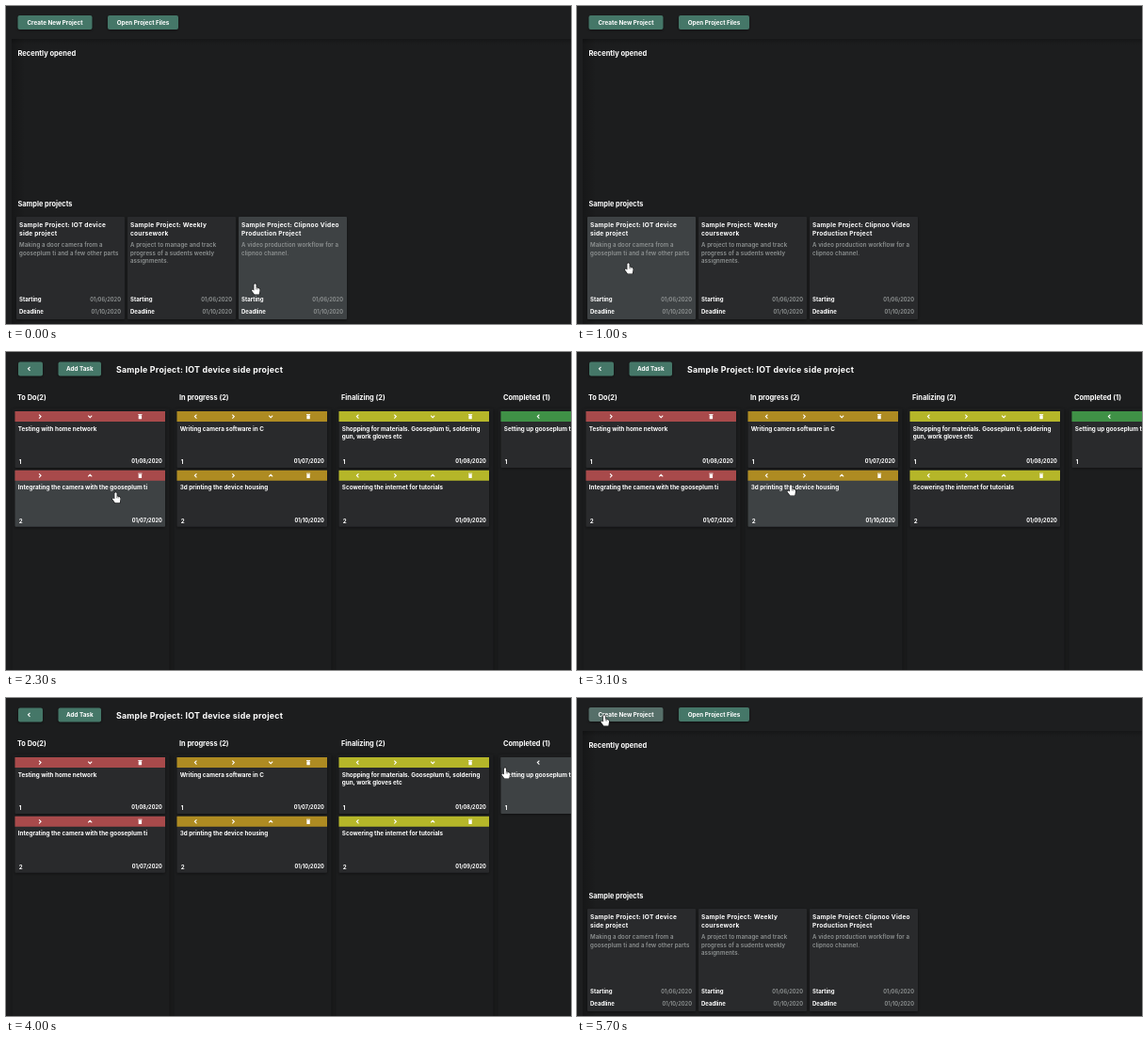
Write an HTML page with a canvas that moves like this. It is 600 px wide and 338 px high and loops after 5.8 s.

```html
<!DOCTYPE html>
<html lang="en">
<head>
<meta charset="utf-8">
<title>Project board</title>
<style>
html, body { margin: 0; height: 100%; overflow: hidden; background: #1c1d1e; }
canvas { display: block; width: 100vw; height: 100vh; }
</style>
</head>
<body>
<canvas id="stage"></canvas>
<script>
const W = 600, H = 338, LOOP = 5800, STEP = 100;
const BOARD_OPENS = 1600, BOARD_CLOSES = 5400;
const canvas = document.getElementById('stage');
const ctx = canvas.getContext('2d');
const scale = window.devicePixelRatio || 1;
canvas.width = W * scale;
canvas.height = H * scale;

const CARD = '#292a2c', CARD_HOVER = '#3e4244';
const BUTTON = '#457768', BUTTON_HOVER = '#566f69';
const MUTED = '#8f9393', WHITE = '#fff';

const samples = [
  { title: ['Sample Project: IOT device', 'side project'],
    about: ['Making a door camera from a', 'gooseplum ti and a few other parts'] },
  { title: ['Sample Project: Weekly', 'coursework'],
    about: ['A project to manage and track', 'progress of a sudents weekly', 'assignments.'] },
  { title: ['Sample Project: Clipnoo Video', 'Production Project'],
    about: ['A video production workflow for a', 'clipnoo channel.'] }
];

const columns = [
  { name: 'To Do(2)', color: '#a84a4b', icons: ['right', 'move', 'trash'], tasks: [
    { text: ['Testing with home network'], date: '01/08/2020' },
    { text: ['Integrating the camera with the gooseplum ti'], date: '01/07/2020' }] },
  { name: 'In progress (2)', color: '#ae8b22', icons: ['left', 'right', 'move', 'trash'], tasks: [
    { text: ['Writing camera software in C'], date: '01/07/2020' },
    { text: ['3d printing the device housing'], date: '01/10/2020' }] },
  { name: 'Finalizing (2)', color: '#b5b629', icons: ['left', 'right', 'move', 'trash'], tasks: [
    { text: ['Shopping for materials. Gooseplum ti, soldering', 'gun, work gloves etc'], date: '01/08/2020' },
    { text: ['Scowering the internet for tutorials'], date: '01/09/2020' }] },
  { name: 'Completed (1)', color: '#3f9146', icons: ['left', 'trash'], hoverColor: CARD_HOVER, tasks: [
    { text: ['Setting up gooseplum ti'], date: '01/06/2020' }] }
];

// Pointer tip: time, x, y
const path = [
  [100, 264.5, 295], [700, 54.5, 273], [1700, 54.5, 273], [2100, 82, 150],
  [2700, 215, 146], [3100, 227, 141], [3300, 233, 128], [3900, 522, 70],
  [4000, 530, 74], [4200, 530, 74], [4800, 48, 5], [5000, 46, 7],
  [5100, 46, 7], [5300, 27, 17], [5700, 29, 18]
];

const handShape = new Path2D('M-1.1 1Q0-.6 1.1 1V4.2L4.2 5.2Q5.2 5.8 5 7.6L4.3 11.4H-.6L-3.6 7.4Q-3.1 5.7-1.1 7.4Z');
const knuckles = new Path2D('M1.2 4.4V6.4M2.7 4.9V6.6');
const arrowShape = new Path2D('M0 0V8.4L2 6.7 3.3 9.7 4.6 9.1 3.3 6.2H5.8Z');

let pointer = { x: 0, y: 0, active: false };

function pointerAt(t) {
  const next = path.findIndex(p => p[0] >= t);
  if (next === 0) return { x: path[0][1], y: path[0][2] };
  const [t0, x0, y0] = path[next - 1], [t1, x1, y1] = path[next];
  const u = (t - t0) / (t1 - t0), k = u * u * (3 - 2 * u);
  return { x: x0 + (x1 - x0) * k, y: y0 + (y1 - y0) * k };
}

function hovered(x, y, w, h) {
  const inside = pointer.x >= x && pointer.x <= x + w && pointer.y >= y && pointer.y <= y + h;
  if (inside) pointer.active = true;
  return inside;
}

function rect(x, y, w, h, color, radius = 0) {
  ctx.fillStyle = color;
  ctx.beginPath();
  ctx.roundRect(x, y, w, h, radius);
  ctx.fill();
}

function shadowed(draw, blur = 3) {
  ctx.save();
  ctx.shadowColor = 'rgba(0,0,0,.45)';
  ctx.shadowBlur = blur * scale;
  ctx.shadowOffsetY = scale;
  draw();
  ctx.restore();
}

// Soft dark edge that fades towards (x + dx, y + dy)
function innerShade(x, y, w, h, dx, dy) {
  const fade = ctx.createLinearGradient(x, y, x + dx, y + dy);
  fade.addColorStop(0, 'rgba(0,0,0,.22)');
  fade.addColorStop(1, 'rgba(0,0,0,0)');
  rect(x, y, w, h, fade);
}

function text(str, x, y, size, { color = WHITE, weight = 700, align = 'left', spacing = 0 } = {}) {
  ctx.font = `${weight} ${size}px Inter, sans-serif`;
  ctx.letterSpacing = spacing + 'px';
  ctx.textAlign = align;
  ctx.fillStyle = color;
  ctx.fillText(str, x, y);
}

function lines(list, x, y, leading, size, style) {
  list.forEach((line, i) => text(line, x, y + i * leading, size, style));
}

function button(x, y, w, label) {
  const color = hovered(x, y, w, 15) ? BUTTON_HOVER : BUTTON;
  shadowed(() => rect(x, y, w, 15, color, 2));
  if (label) text(label, x + w / 2, y + 9.6, 6.3, { align: 'center' });
}

function chevron(x, y, direction) {
  const turn = { right: 0, down: 1, left: 2, up: 3 }[direction];
  ctx.save();
  ctx.translate(x, y);
  ctx.rotate(turn * Math.PI / 2);
  ctx.strokeStyle = WHITE;
  ctx.lineWidth = 1.1;
  ctx.beginPath();
  ctx.moveTo(-1, -2);
  ctx.lineTo(1, 0);
  ctx.lineTo(-1, 2);
  ctx.stroke();
  ctx.restore();
}

function trash(x, y) {
  rect(x - 2.1, y - 2.6, 4.2, 0.9, WHITE);
  rect(x - 1.7, y - 1.3, 3.4, 4, WHITE, 0.5);
}

function drawHome() {
  rect(0, 0, W, H, '#1d1e1f');
  rect(6, 35, W, H, '#1c1d1e');
  innerShade(6, 35, 14, H, 14, 0);
  innerShade(6, 35, W, 6, 0, 6);
  button(12.5, 10, 79, 'Create New Project');
  button(108, 10, 75, 'Open Project Files');
  text('Recently opened', 12.5, 52.7, 7.5);
  text('Sample projects', 12.5, 213, 7.35);

  samples.forEach(({ title, about }, i) => {
    const x = 11 + i * 118, left = x + 3, right = x + 111;
    const color = hovered(x, 224, 115, 109) ? CARD_HOVER : CARD;
    shadowed(() => rect(x, 224, 115, 109, color, 1));
    lines(title, left, 235.2, 8.8, 6.6, { spacing: 0.22 });
    lines(about, left, 256.2, 8.4, 6.1, { color: MUTED, weight: 600, spacing: 0.1 });
    [['Starting', '01/06/2020', 313.6], ['Deadline', '01/10/2020', 327]].forEach(([label, date, y]) => {
      text(label, left, y, 6);
      text(date, right, y, 5.75, { color: MUTED, weight: 600, align: 'right' });
    });
  });
}

function drawTask(column, task, index, x) {
  const y = 63 + index * 62.7, w = 159.5;
  const over = hovered(x, y, w, 60);
  const headColor = over && column.hoverColor || column.color;
  shadowed(() => rect(x, y, w, 60, over ? CARD_HOVER : CARD, 1));
  rect(x, y, w, 11, headColor);
  column.icons.forEach((icon, i) => {
    const iconX = x + w * (2 * i + 1) / (2 * column.icons.length), iconY = y + 5.6;
    if (icon === 'trash') trash(iconX, iconY);
    else chevron(iconX, iconY, icon === 'move' ? (index ? 'up' : 'down') : icon);
  });
  lines(task.text, x + 3.3, y + 20.5, 8.6, 6.3);
  text(index + 1, x + 4.3, y + 56, 6.2);
  text(task.date, x + 156.2, y + 55, 5.6, { align: 'right' });
}

function drawBoard() {
  rect(0, 0, W, H, '#1c1d1e');
  button(13, 10.5, 26);
  chevron(24.5, 17.8, 'left');
  button(55.5, 10.5, 45.5, 'Add Task');
  text('Sample Project: IOT device side project', 117, 21.5, 8.8, { spacing: 0.24 });

  columns.forEach((column, i) => {
    const x = 9.5 + i * 172;
    shadowed(() => rect(x - 3, 60, 167, H, '#1c1d1e'), 4);
    text(column.name, x + 2.5, 51.3, 7.4);
    column.tasks.forEach((task, n) => drawTask(column, task, n, x));
  });
}

function drawPointer() {
  const shape = pointer.active ? handShape : arrowShape;
  ctx.save();
  ctx.translate(pointer.x, pointer.y);
  ctx.lineWidth = 1.2;
  ctx.strokeStyle = '#151617';
  ctx.stroke(shape);
  ctx.fillStyle = WHITE;
  ctx.fill(shape);
  if (pointer.active) {
    ctx.lineWidth = 0.5;
    ctx.stroke(knuckles);
  }
  ctx.restore();
}

function render(now) {
  const t = Math.floor(now % LOOP / STEP) * STEP;
  const onBoard = t >= BOARD_OPENS && t < BOARD_CLOSES;
  ctx.setTransform(scale, 0, 0, scale, 0, 0);
  pointer = { ...pointerAt(t), active: false };
  if (onBoard) drawBoard();
  else drawHome();
  drawPointer();
}

const start = performance.now();
function loop() {
  render(performance.now() - start);
  requestAnimationFrame(loop);
}
loop();
</script>
</body>
</html>
```
